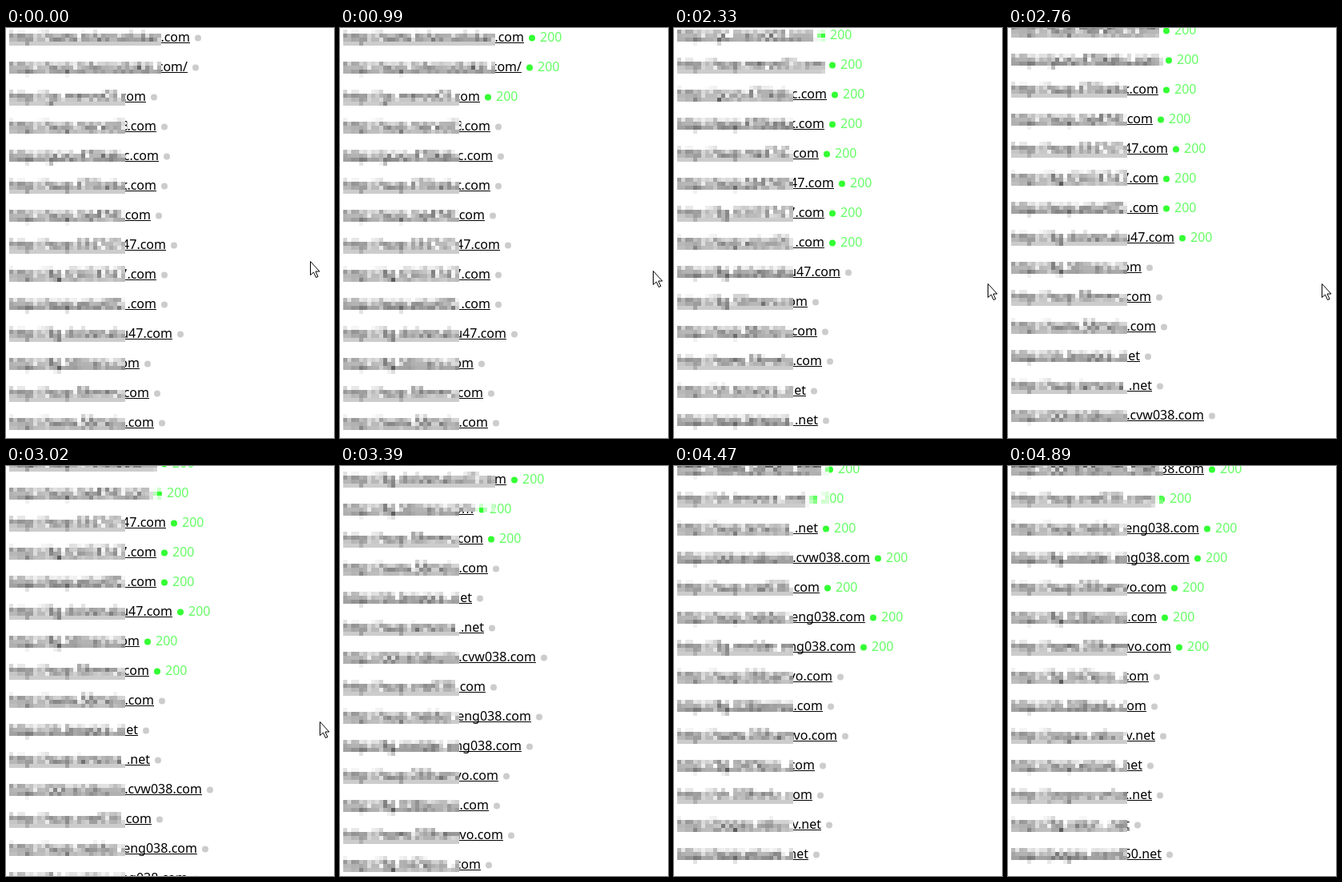
An HTML page with a canvas that plays this animation: 410 px wide and 512 px high, repeating every 5.02 s.

```html
<!DOCTYPE html>
<html lang="en">
<head>
<meta charset="utf-8">
<title>Link check</title>
<style>
  html, body { margin: 0; width: 100%; height: 100%; overflow: hidden; background: #fff; }
  canvas { display: block; }
</style>
</head>
<body>
<canvas id="stage" width="410" height="512"></canvas>
<script>
const W = 410, H = 512, LOOP = 5020;
const LEFT = 4, PITCH = 37, BASE = 17, BLOCK = 5;

// right edge, blurred part, readable tail
const rows = `
230 www.tolvenadukame .com
227 wap.tolvenadukame .com/
175 gc.mervo038le .com
188 wap.mervo038 .com
191 gcvo.470kelu c.com
188 wap.470keluc .com
181 wap.me4747 .com
200 wap.63474747 47.com
188 4g.634747477 7.com
188 wap.velu470 .com
208 4g.dolvenakue u47.com
167 4g.58mervo .com
179 wap.58mervo .com
185 www.58melun .com
165 sh.tenvora .net
180 wap.tenvora .net
245 dolvenakume .cvw038.com
182 wap.cvw038 .com
239 wap.melder eng038.com
227 4g.melder eng038.com
198 wap.038sem vo.com
186 4g.038semv vo.com
204 www.038sem vo.com
176 3g.047levo .com
173 sh.038velu .com
184 pogau.veluv v.net
168 wap.veluve .net
180 pogova.velu x.net
152 3g.velun .net
192 pogau.mer4 50.net`.trim().split("\n").map(line => {
  const [right, head, tail] = line.split(" ");
  return { right: +right, head: "http://" + head, tail };
});

// time at which each row answers
const replies = [690, 840, 990, 1130, 1250, 1500, 1640, 1920, 2200, 2330, 2760, 2880,
  3020, 3510, 3510, 3660, 3780, 3930, 4070, 4470, 4620, 4770, 4890];

const scrolls = [[0, 0], [2200, 20], [2330, 77], [2450, 100], [2760, 120], [2880, 177],
  [3020, 200], [3140, 220], [3270, 292], [3390, 365], [3510, 400],
  [4470, 489], [4620, 563], [4770, 598], [4890, 600]];

const pointers = [[0, 380, 291], [840, 388, 294], [990, 391, 303], [1130, 393, 312],
  [1380, 393, 317], [1640, 392, 319], [3140, 402, 321], [3270, W + 20, 321]];

const ctx = document.getElementById("stage").getContext("2d", { willReadFrequently: true });
const arrow = new Path2D("M0 0V17L4 13.5L7 20L9.5 19L6.5 12.5H11.5Z");

const at = (steps, t) => steps.findLast(step => step[0] <= t);

function drawRow(row, top, done) {
  const y = top + BASE, { right, head, tail } = row;
  const split = right - ctx.measureText(tail).width;

  ctx.fillStyle = "#000";
  ctx.save();
  ctx.beginPath();
  ctx.rect(0, top, split, PITCH);
  ctx.clip();
  ctx.fillText(head, LEFT, y);
  ctx.restore();
  ctx.fillText(tail, split, y);
  ctx.fillRect(LEFT, y + 1, right - LEFT, 1);

  ctx.fillStyle = done ? "#33ff33" : "#cccccc";
  ctx.beginPath();
  ctx.arc(right + 10, y - 4.5, 4, 0, 2 * Math.PI);
  ctx.fill();
  if (done) {
    ctx.fillStyle = "#66ff66";
    ctx.fillText("200", right + 20, y);
  }
}

// replace a region by block averages
function pixelate(x0, y0, x1, y1) {
  const w = x1 - x0, h = y1 - y0;
  const { data } = ctx.getImageData(x0, y0, w, h);
  for (let by = 0; by < h; by += BLOCK) {
    for (let bx = 0; bx < w; bx += BLOCK) {
      const sum = [0, 0, 0];
      const ye = Math.min(by + BLOCK, h), xe = Math.min(bx + BLOCK, w);
      for (let y = by; y < ye; y++)
        for (let x = bx; x < xe; x++)
          for (let c = 0; c < 3; c++) sum[c] += data[(y * w + x) * 4 + c];
      const n = (ye - by) * (xe - bx);
      ctx.fillStyle = `rgb(${sum.map(v => Math.round(v / n))})`;
      ctx.fillRect(x0 + bx, y0 + by, xe - bx, ye - by);
    }
  }
}

function drawPointer(x, y) {
  ctx.save();
  ctx.translate(x + 0.5, y + 0.5);
  ctx.fillStyle = "#fff";
  ctx.strokeStyle = "#000";
  ctx.fill(arrow);
  ctx.stroke(arrow);
  ctx.restore();
}

function draw(scroll, answered, x, y) {
  ctx.fillStyle = "#fff";
  ctx.fillRect(0, 0, W, H);
  ctx.font = '16px "Noto Sans", "Open Sans", sans-serif';
  rows.forEach((row, i) => {
    const top = i * PITCH - scroll;
    if (top > -PITCH && top < H) drawRow(row, top, i < answered);
  });
  pixelate(LEFT, 0, 194, 2);
  pixelate(LEFT, 2, 194, 57);
  pixelate(LEFT, 57, 149, H);
  drawPointer(x, y);
}

let shown = "";
const start = performance.now();

function tick() {
  const t = (performance.now() - start) % LOOP;
  const [, scroll] = at(scrolls, t);
  const [, x, y] = at(pointers, t);
  const answered = replies.filter(time => time <= t).length;
  const state = [scroll, answered, x, y];
  if (state.join() !== shown) {
    shown = state.join();
    draw(...state);
  }
  requestAnimationFrame(tick);
}
tick();
</script>
</body>
</html>
```
